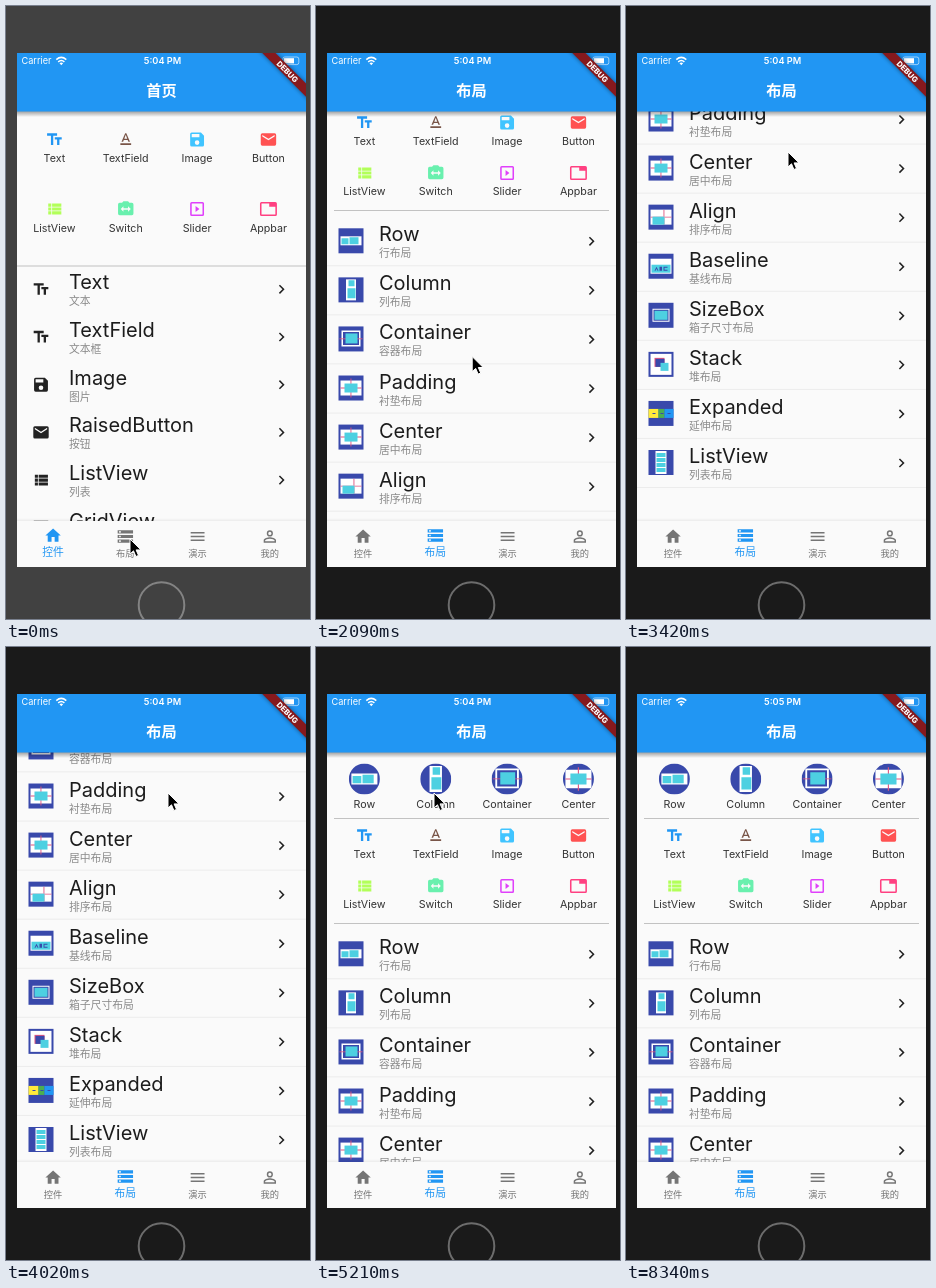
These frames come from a looping animation (304 by 613 pixels, 8.79 s). An HTML page:

```html
<!DOCTYPE html>
<html lang="zh">
<head>
<meta charset="utf-8">
<style>
html, body { margin: 0; width: 100%; height: 100%; overflow: hidden; }
svg { display: block; width: 304px; height: 613px; }
text { font-family: Inter, "Noto Sans CJK SC", "Noto Sans CJK", sans-serif; }
path { fill-rule: evenodd; }
</style>
</head>
<body>
<svg id="stage" viewBox="0 0 304 613"></svg>
<script>
const LOOP = 8790, TICK = 148.98;
const BLUE = '#2196f3', GREY = '#757575', INDIGO = '#3949ab', PAPER = '#fafafa';

// Icons on a 24-unit grid
const icons = {
  text: 'M2.5 4v3h5v12h3V7h5V4zM21.5 9h-9v3h3v7h3v-7h3z',
  format: 'M5 17v2h14v-2zM9.5 12.8h5l.9 2.2h2.1L12.75 4h-1.5L6.5 15h2.1zM12 5.98L13.87 11h-3.74z',
  save: 'M17 3H5a2 2 0 0 0-2 2v14a2 2 0 0 0 2 2h14a2 2 0 0 0 2-2V7zM12 19a3 3 0 1 1 0-6 3 3 0 0 1 0 6zM15 9H5V5h10z',
  mail: 'M20 4H4a2 2 0 0 0-2 2v12a2 2 0 0 0 2 2h16a2 2 0 0 0 2-2V6a2 2 0 0 0-2-2zM20 8l-8 5-8-5V6l8 5 8-5z',
  list: 'M4 14h4v-4H4zM4 19h4v-4H4zM4 9h4V5H4zM9 14h12v-4H9zM9 19h12v-4H9zM9 5v4h12V5z',
  swap: 'M20 4h-3.2L15 2H9L7.2 4H4a2 2 0 0 0-2 2v12a2 2 0 0 0 2 2h16a2 2 0 0 0 2-2V6a2 2 0 0 0-2-2zM15 15.5V13H9v2.5L5.5 12 9 8.5V11h6V8.5l3.5 3.5z',
  slide: 'M10 8v8l5-4zM19 3H5a2 2 0 0 0-2 2v14a2 2 0 0 0 2 2h14a2 2 0 0 0 2-2V5a2 2 0 0 0-2-2zM19 19H5V5h14z',
  tab: 'M21 3H3a2 2 0 0 0-2 2v14a2 2 0 0 0 2 2h18a2 2 0 0 0 2-2V5a2 2 0 0 0-2-2zM21 19H3V5h10v4h8z',
  home: 'M10 20v-6h4v6h5v-8h3L12 3 2 12h3v8z',
  rack: 'M2 20h20v-4H2zM4 17h2v2H4zM2 4v4h20V4zM6 7H4V5h2zM2 14h20v-4H2zM4 11h2v2H4z',
  menu: 'M3 18h18v-2H3zM3 13h18v-2H3zM3 6v2h18V6z',
  person: 'M12 5.9a2.1 2.1 0 1 1 0 4.2 2.1 2.1 0 0 1 0-4.2M12 14.9c3 0 6.1 1.46 6.1 2.1v1.1H5.9V17c0-.64 3.1-2.1 6.1-2.1M12 4a4 4 0 1 0 0 8 4 4 0 0 0 0-8zM12 13c-2.67 0-8 1.34-8 4v3h16v-3c0-2.66-5.33-4-8-4z',
  next: 'M10 6L8.6 7.4 13.2 12l-4.6 4.6L10 18l6-6z'
};

// Layout thumbnails on a 25-unit grid, one path per colour
const tint = { w: '#fff', r: '#e0557f', c: '#4dd0e1', b: '#2196f3', y: '#ffeb3b', g: '#4caf50', i: INDIGO };
const panel = 'M2 5h21v15H2z';
const centred = { w: panel, r: 'M2 12h21v.9H2zM12 3h.9v19H12z', c: 'M6 8h13v9H6z' };
const layouts = [
  ['Row', '行布局', { w: 'M2 8h21v9H2z', c: 'M3 10h7v6H3zM11 9h9v7h-9z' }],
  ['Column', '列布局', { w: 'M7.5 2h10v21h-10z', c: 'M10 3h6v6h-6zM9 11h8v10H9z' }],
  ['Container', '容器布局', { w: 'M3 4h19v16H3zM4.5 5.5v13h16v-13z', r: 'M1 12h23v.8H1z', c: 'M7 7h12v10H7z' }],
  ['Padding', '衬垫布局', centred],
  ['Center', '居中布局', centred],
  ['Align', '排序布局', { w: panel, r: 'M2 12h21v.9H2zM15 5h.9v15H15z', c: 'M4 12h12v8H4z' }],
  ['Baseline', '基线布局', { w: panel, c: 'M3 11h19v8H3z', i: 'M6 17l2-4 2 4h-1l-1-2-1 2zM11 13h2.5v4H11zM15 13h4v1h-3v2h3v1h-4z' }],
  ['SizeBox', '箱子尺寸布局', { w: 'M4 6h17v13H4zM5 7v11h15V7z', c: 'M6 8h13v9H6z' }],
  ['Stack', '堆布局', { w: 'M2 2h21v21H2z', r: 'M6 6h10v9H6z', i: 'M7 7h9v8H7z', c: 'M12 11h8v8h-8z' }],
  ['Expanded', '延伸布局', { y: 'M0 8h10v9H0z', g: 'M10 8h6v9h-6z', b: 'M16 8h9v9h-9z', i: 'M4 12h3v1H4zM12 12h3v1h-3zM19 12h3v1h-3z' }],
  ['ListView', '列表布局', { w: 'M7 1h11v23H7z', c: 'M8 3h9v4H8zM8 8h9v4H8zM8 13h9v4H8zM8 18h9v4H8z' }]
];
const widgets = [
  ['Text', 'text', BLUE], ['TextField', 'format', '#795548'],
  ['Image', 'save', '#40c4ff'], ['Button', 'mail', '#ff5252'],
  ['ListView', 'list', '#b2ff59'], ['Switch', 'swap', '#69f0ae'],
  ['Slider', 'slide', '#e040fb'], ['Appbar', 'tab', '#ff4081']
];
const controls = [
  ['Text', '文本', 'text'], ['TextField', '文本框', 'text'], ['Image', '图片', 'save'],
  ['RaisedButton', '按钮', 'mail'], ['ListView', '列表', 'list'], ['GridView', '网格', 'tab']
];
const tabs = [['控件', 'home'], ['布局', 'rack'], ['演示', 'menu'], ['我的', 'person']];

const rect = (x, y, w, h, fill) => `<rect x="${x}" y="${y}" width="${w}" height="${h}" fill="${fill}"/>`;
const text = (s, x, y, size, fill, more = '') => `<text x="${x}" y="${y}" font-size="${size}" fill="${fill}" ${more}>${s}</text>`;
const mid = 'text-anchor="middle"';
const icon = (name, x, y, fill, s = .77) =>
  `<path d="${icons[name]}" fill="${fill}" transform="translate(${x - 12 * s} ${y - 12 * s}) scale(${s})"/>`;
const thumb = (art, x, y, s = 1, more = '') =>
  `<g transform="translate(${x} ${y}) scale(${s})" ${more}>${rect(0, 0, 25, 25, INDIGO)}` +
  Object.keys(art).map(k => `<path d="${art[k]}" fill="${tint[k]}"/>`).join('') + '</g>';
const column = i => 48.4 + 71.35 * (i % 4);

const widgetGrid = (top, gap, drop) => widgets.map(([name, pic, fill], i) => {
  const y = top + gap * (i >> 2);
  return icon(pic, column(i), y, fill) + text(name, column(i), y + drop, 10.7, '#333', mid);
}).join('');

const listRow = (name, note, y) =>
  text(name, 63, y, 20, '#1c1c1c') + text(note, 63, y + 16, 10.8, '#8a8a8a') + icon('next', 275.5, y, '#222');

const homeBody = widgetGrid(133.5, 69.5, 22.5) + rect(11, 259.5, 289, 1, '#c2c2c2') +
  controls.map(([name, note, pic], i) => {
    const y = 283.3 + 47.7 * i;
    return listRow(name, note, y) + icon(pic, 35, y, '#222');
  }).join('');

const layoutBody =
  layouts.slice(0, 2).concat(layouts.slice(2, 3), layouts.slice(4, 5)).map(([name, , art], i) =>
    thumb(art, column(i) - 15.5, 116.5, 1.24, 'clip-path="url(#disc)"') +
    text(name, column(i), 161, 10.7, '#333', mid)).join('') +
  rect(18, 171, 275, 1, '#c2c2c2') + widgetGrid(188.5, 50.5, 22.3) + rect(18, 276, 275, 1, '#c2c2c2') +
  layouts.map(([name, note, art], i) => {
    const y = 307.3 + 49.07 * i;
    return listRow(name, note, y) + thumb(art, 22.5, y - 13) + rect(11, y + 24, 289, 1, '#ececec');
  }).join('');

const chrome = (title, active) =>
  rect(11, 105, 289, 6, 'url(#shade)') + rect(11, 47, 289, 58.5, BLUE) +
  text(title, 155.5, 89.6, 15.2, '#fff', mid + ' font-weight="600"') +
  rect(11, 512, 289, 3, 'url(#lift)') + rect(11, 515, 289, 46, PAPER) +
  tabs.map(([name, pic], i) => {
    const on = i === active, x = 47.1 + 72.25 * i, fill = on ? BLUE : GREY;
    return icon(pic, x, on ? 529.5 : 530.5, fill) + text(name, x, on ? 550.3 : 551.2, on ? 10.8 : 9.25, fill, mid);
  }).join('');

const stage = document.getElementById('stage');
stage.innerHTML = `
<defs>
  <clipPath id="disc"><circle cx="12.5" cy="12.5" r="12.5"/></clipPath>
  <clipPath id="screen">${rect(11, 47, 289, 514, '#000')}</clipPath>
  <linearGradient id="shade" x2="0" y2="1"><stop stop-opacity=".38"/><stop offset="1" stop-opacity="0"/></linearGradient>
  <linearGradient id="lift" x2="0" y2="1"><stop stop-opacity="0"/><stop offset="1" stop-opacity=".06"/></linearGradient>
  <filter id="soft" x="-20%" y="-80%" width="140%" height="260%"><feGaussianBlur stdDeviation="2"/></filter>
</defs>
<rect id="desk" width="304" height="613"/>
<circle id="ring" cx="155.5" cy="599" r="22.8" fill="none" stroke-width="2"/>
<g clip-path="url(#screen)">
  ${rect(11, 47, 289, 514, PAPER)}
  <g id="home">${homeBody}${chrome('首页', 0)}</g>
  <g id="layout"><g id="scroll">${layoutBody}</g>${chrome('布局', 1)}</g>
  ${text('Carrier', 15.5, 58.2, 9.2, '#fff')}
  <g fill="none" stroke="#fff" stroke-width="1.5"><path d="M50.3 53.6q5-4.4 10 0M52.2 55.9q3.1-2.8 6.2 0"/></g>
  <path d="M53.5 57.2q1.8-1.5 3.6 0l-1.8 2z" fill="#fff"/>
  <text id="clock" x="156.5" y="58.2" font-size="9.2" font-weight="600" fill="#fff" ${mid}></text>
  <rect x="276.8" y="51" width="16" height="7.6" rx="2" fill="none" stroke="#fff" stroke-opacity=".55"/>
  ${rect(278, 52.2, 10, 5.2, '#fff')}
  <g transform="translate(300 47) rotate(45)">
    <rect x="-48" y="21.6" width="96" height="9.3" opacity=".5" filter="url(#soft)"/>
    ${rect(-48, 21.6, 96, 9.3, '#86191d')}
    ${text('DEBUG', 0, 29.1, 7.7, '#fff', mid + ' font-weight="800"')}
  </g>
</g>
<path id="cursor" d="M0 0v15l3.5-3.2 2.4 5.7 2.6-1.1-2.4-5.5h4.9z" stroke="#fff" stroke-width="1"/>`;

// Keys are [tick, values...], joined by straight lines
const deskKeys = [[0, 65], [1, 52], [4, 26]];
const scrollKeys = [[11, 0], [12, 12], [13, 38], [14, 72], [16, 152], [17, 196], [18, 223], [19, 232],
  [20, 250], [22, 326], [23, 341], [24, 332], [25, 318], [26, 309], [27, 305],
  [28, 272], [29, 172], [30, 62], [31, -6], [32, -15], [33, -8], [34, -3], [35, 0]];
const cursorKeys = [[0, 124, 533], [6, 124, 533], [8, 158, 434], [11, 158, 434], [16, 155, 295], [19, 155, 295],
  [23, 162, 146], [27, 162, 146], [30, 153, 402], [31, 153, 402], [35, 118, 146], [36, 118, 145], [42, 118, 145],
  [43, 118, 167], [48, 107, 408], [49, 107, 408], [53, 210, 601], [54, 210, 601], [55, 226, 604]];

function at(keys, k) {
  const n = keys.findIndex(key => key[0] >= k);
  if (n < 0) return keys[keys.length - 1].slice(1);
  if (n === 0) return keys[0].slice(1);
  const a = keys[n - 1], b = keys[n], u = (k - a[0]) / (b[0] - a[0]);
  return a.slice(1).map((v, i) => v + (b[i + 1] - v) * u);
}

const el = id => document.getElementById(id);
const show = (id, on) => el(id).style.display = on ? '' : 'none';
let last = -1;

function draw() {
  // The screen refreshes in even ticks
  const k = Math.floor((performance.now() % LOOP + 8) / TICK);
  if (k !== last) {
    last = k;
    const [g] = at(deskKeys, k);
    el('desk').setAttribute('fill', `rgb(${g},${g},${g})`);
    el('ring').setAttribute('stroke', `rgb(${g * .6 + 92},${g * .6 + 92},${g * .6 + 92})`);
    show('home', k < 2);
    show('layout', k >= 2);
    show('cursor', k < 56);
    el('scroll').setAttribute('transform', `translate(0 ${-at(scrollKeys, k)[0]})`);
    el('cursor').setAttribute('transform', `translate(${at(cursorKeys, k)})`);
    el('clock').textContent = k < 45 ? '5:04 PM' : '5:05 PM';
  }
  requestAnimationFrame(draw);
}
draw();
</script>
</body>
</html>
```
